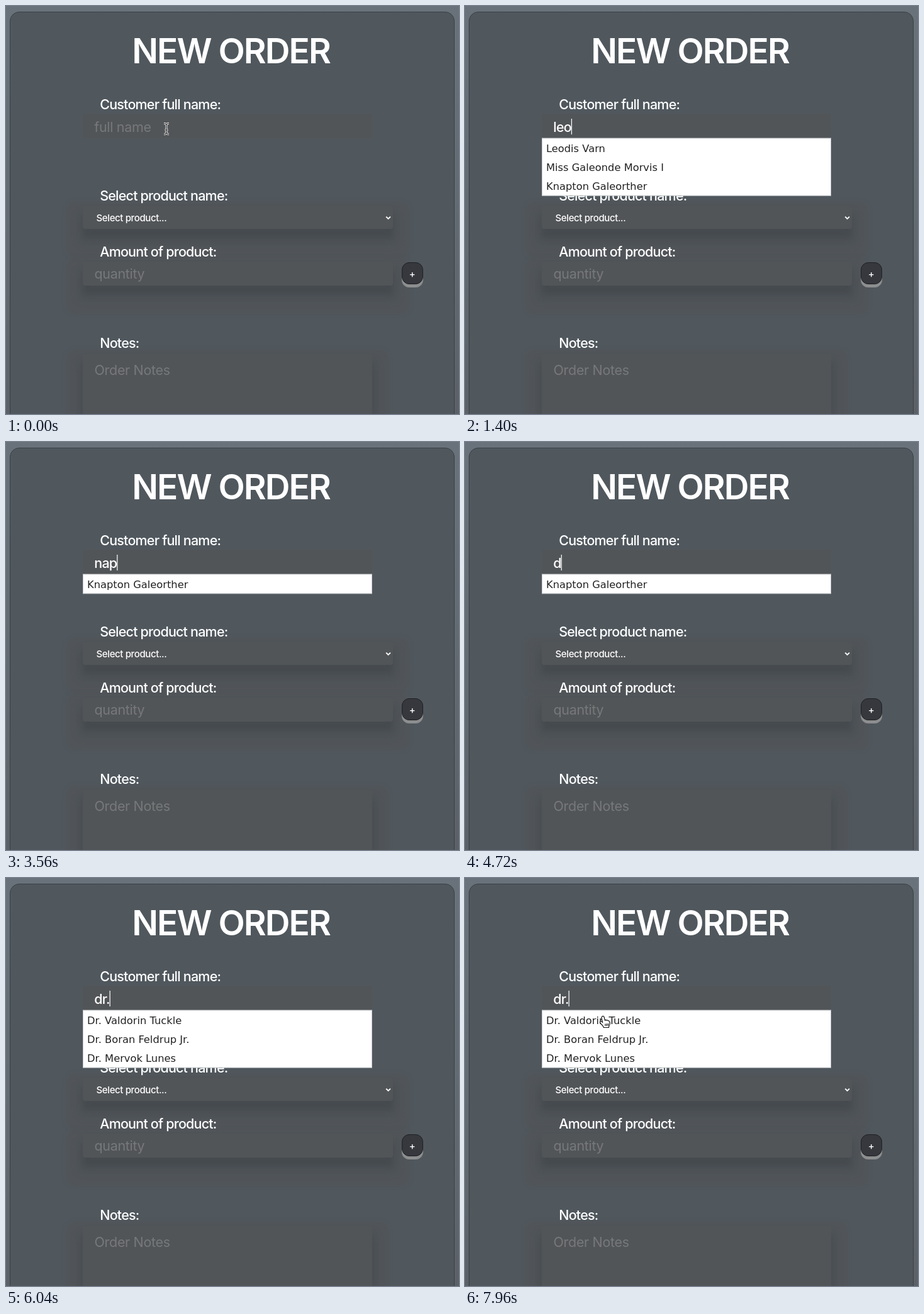
Animation, 720 px wide and 648 px high, one loop 8 s. Source, as an HTML page:

```html
<!DOCTYPE html>
<html lang="en">
<head>
<meta charset="utf-8">
<title>New order</title>
<style>
  html, body { margin: 0; width: 100%; height: 100%; overflow: hidden; }
  body { position: relative; background: linear-gradient(#69717a, #626a70 60%, #5b6167); }
  div, svg { position: absolute; box-sizing: border-box; }
  svg { left: 0; top: 0; width: 720px; height: 648px; }
  .panel { left: 5.5px; top: 8.5px; width: 707.5px; height: 700px; border: 1px solid #3a4045;
    border-radius: 15px; background: #50585e; }
  .field { left: 122px; background: #525558; border-radius: 4px; }
  .deep { box-shadow: 0 15px 10px rgba(66, 71, 76, .65), 0 17px 8px 10px rgba(76, 81, 86, .45),
    0 19px 5px 27px rgba(82, 84, 86, .6); }
  .add { left: 629px; top: 407px; width: 34px; height: 35px; border: 1px solid #1f2125;
    border-radius: 12px; background: #36383d; box-shadow: 0 5px #8d8e8f; }
  text { font-family: Inter, sans-serif; fill: #fff; white-space: pre; }
  .title { font-size: 55px; font-weight: 600; letter-spacing: -1.95px; }
  .label { font-size: 21.5px; font-weight: 500; letter-spacing: -.8px; }
  .input { font-size: 21.5px; font-weight: 500; letter-spacing: -.8px; }
  .hint { fill: #76787a; font-weight: 400; letter-spacing: -.32px; }
  .small { font-size: 15px; font-weight: 500; letter-spacing: -.38px; }
  .item { font: 16.3px "DejaVu Sans", Verdana, sans-serif; fill: #222; }
</style>
</head>
<body>
<div class="panel"></div>
<div class="field" style="top:171px;width:460px;height:39px"></div>
<div class="field deep" style="top:318px;width:493px;height:36px"></div>
<div class="field deep" style="top:407px;width:493px;height:37px"></div>
<div class="field deep" style="top:553px;width:460px;height:140px"></div>
<div class="add"></div>
<svg viewBox="0 0 720 648">
  <text class="title" x="200.3" y="91">NEW ORDER</text>
  <text class="label" x="149.2" y="164.3">Customer full name:</text>
  <text class="label" x="149.2" y="309">Select product name:</text>
  <text class="small" x="143.5" y="342">Select product...</text>
  <path d="M604.2 334.6l3.4 3.4 3.4-3.4" fill="none" stroke="#fff" stroke-width="1.8"/>
  <text class="label" x="149.2" y="398">Amount of product:</text>
  <text class="input hint" x="140.5" y="433">quantity</text>
  <text class="label" x="149.2" y="543">Notes:</text>
  <text class="input hint" x="140.5" y="586">Order Notes</text>
  <text class="small" x="645.5" y="430.5" text-anchor="middle">+</text>
  <text class="input" id="query" x="140.3" y="199.5"></text>
  <rect id="caret" y="179" width="1.2" height="25" fill="#fff"/>
  <g id="list"></g>
  <g id="beam" fill="none">
    <path id="stem" d="M-4-8.5Q0-8.5 0-6Q0-8.5 4-8.5M0-6V6M-4 8.5Q0 8.5 0 6Q0 8.5 4 8.5M-2.5 2H2.5"/>
    <use href="#stem" stroke="#fff" stroke-width="3"/>
    <use href="#stem" stroke="#222" stroke-width="1.2"/>
  </g>
  <path id="arrow" d="M0 0V15L3.6 11.8 6 17.3 8.3 16.3 6 11H10.5Z" fill="#111" stroke="#fff" stroke-width="1.2"/>
  <path id="hand" d="M-3-8Q-1.5-9.5 0-7.5L1.5-2Q3-3.5 4.2-1.8Q5.8-3 6.8-1Q8.5-1.5 9 .5Q10 4 8 6.5L7.5 9.5H-.5Q-1.5 6.5-5 3.5Q-7.5.8-5.8-.2Q-4.5-.8-2.5 1.2L-4-6Q-4-7.5-3-8ZM2 3.5V7M4.4 3.2V7M6.6 3V6.5" fill="#fff" stroke="#111" stroke-width="1.2"/>
</svg>
<script>
const LOOP = 8000;
const $ = id => document.getElementById(id);
const query = $("query"), caret = $("caret"), list = $("list");

// [time, value] steps
const typed = [[0, ""], [520, "l"], [880, "le"], [1080, "leo"], [1920, "le"], [2320, "l"], [2480, ""],
  [2920, "n"], [3040, "na"], [3280, "nap"], [4240, "na"], [4400, "n"], [4600, ""],
  [4720, "d"], [5320, "dr"], [5760, "dr."]];
const blink = [[0, 0], [520, 1], [1600, 0], [2080, 1], [2560, 0], [2920, 1], [3760, 0],
  [4240, 1], [5200, 0], [5320, 1], [6240, 0], [6720, 1], [7200, 0], [7720, 1]];
const knap = "Knapton Galeorther";
const results = [[0, []], [1400, ["Leodis Varn", "Miss Galeonde Morvis I", knap]], [2240, []],
  [3560, [knap]], [5120, []],
  [6040, ["Dr. Valdorin Tuckle", "Dr. Boran Feldrup Jr.", "Dr. Mervok Lunes"]]];
// time, x, y
const path = [[7480, 255, 190], [7600, 262, 96], [7680, 263, 54], [7760, 255, 96],
  [7880, 229, 208], [7960, 221, 228]];

const at = (steps, t) => steps.findLast(s => s[0] <= t)[1];

function mouse(t) {
  if (t < 520) return [255, 195];
  if (t < path[0][0]) return null;
  const i = path.findIndex(p => p[0] > t);
  if (i < 0) return path.at(-1).slice(1);
  const [a, b] = [path[i - 1], path[i]], k = (t - a[0]) / (b[0] - a[0]);
  return [a[1] + (b[1] - a[1]) * k, a[2] + (b[2] - a[2]) * k];
}

function pointerAt(y) {
  if (y >= 210) return "hand";
  return y >= 171 || (y > 40 && y < 105) ? "beam" : "arrow";
}

function showList(names) {
  const h = names.length * 30.2 + .6;
  list.innerHTML = names.length
    ? `<rect x="122.5" y="210" width="459" height="${h}" fill="#fff" stroke="#c4c8ca"/>` +
      names.map((n, i) => `<text class="item" x="129" y="${232 + i * 30.1}">${n}</text>`).join("")
    : "";
}

let shown;
function draw(t) {
  const text = at(typed, t), names = at(results, t), pos = mouse(t);
  query.textContent = text || "full name";
  query.classList.toggle("hint", !text);
  caret.setAttribute("x", text ? 140.2 + query.getComputedTextLength() : 140.5);
  caret.style.display = at(blink, t) ? "" : "none";
  if (names !== shown) showList(shown = names);
  for (const id of ["beam", "arrow", "hand"]) {
    const on = pos && pointerAt(pos[1]) === id;
    $(id).style.display = on ? "" : "none";
    if (on) $(id).setAttribute("transform", `translate(${pos})`);
  }
}

const start = performance.now();
function tick() {
  draw((performance.now() - start) % LOOP);
  requestAnimationFrame(tick);
}
tick();
</script>
</body>
</html>
```
